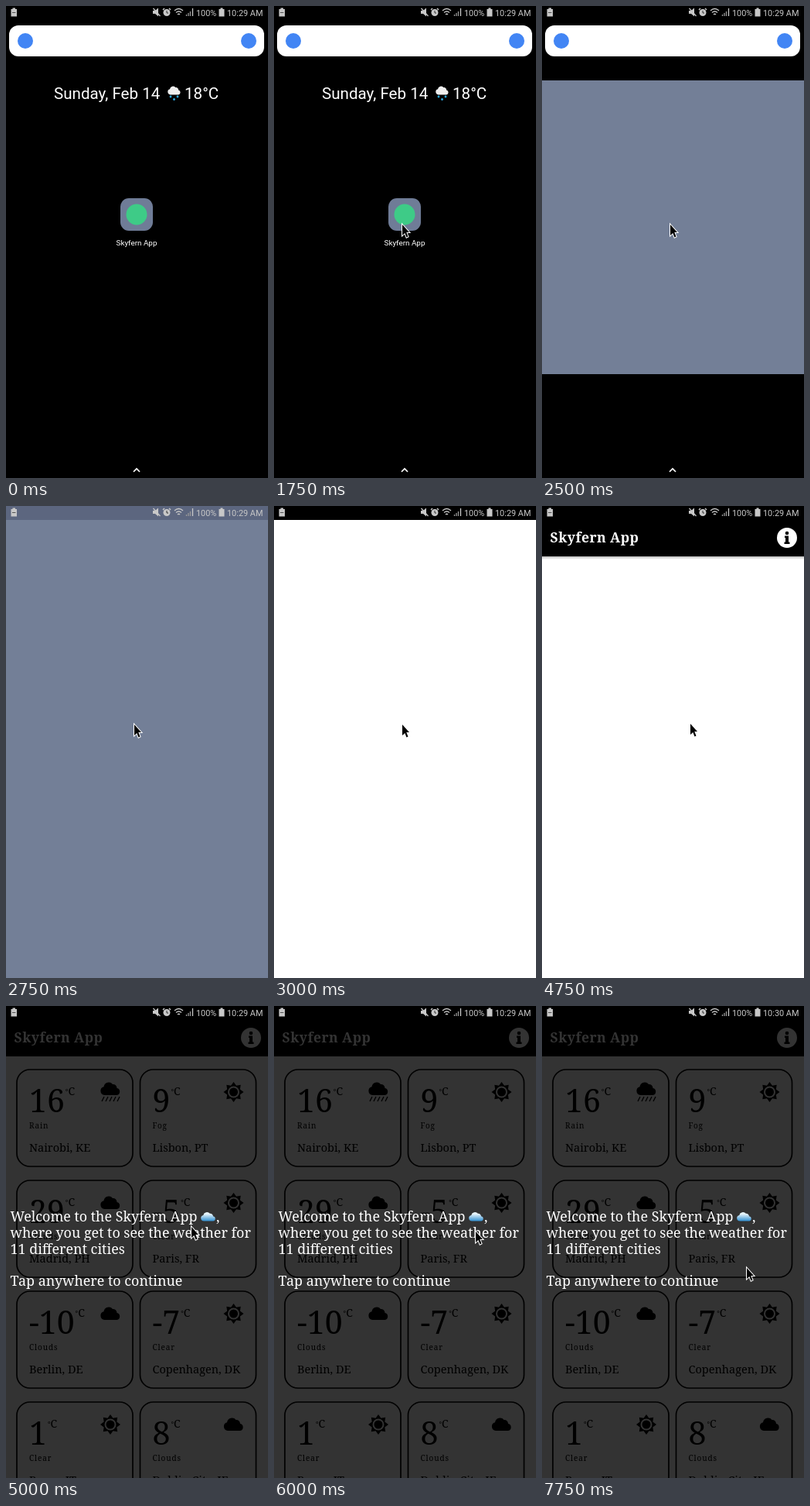
These frames come from a looping animation (339x609 px, 8000 ms). An HTML page:

```html
<!DOCTYPE html>
<html lang="en">
<head>
<meta charset="utf-8">
<title>Skyfern App</title>
<style>
  html, body { margin: 0; width: 100%; height: 100%; overflow: hidden; background: #000; }
  svg { display: block; width: 339px; height: 609px; }
  .sans { font-family: Roboto, sans-serif; }
  .serif { font-family: "Noto Serif", serif; }
</style>
</head>
<body>
<svg id="stage" viewBox="0 0 339 609" xmlns="http://www.w3.org/2000/svg">
  <defs>
    <path id="cloud" d="M5.5 18A5.5 5.5 0 0 1 4.5 7.2A6.5 6.5 0 0 1 16 4A5 5 0 0 1 21.5 9A4.6 4.6 0 0 1 21.5 18Z"/>
    <g id="rain">
      <use href="#cloud"/>
      <path d="M5 20l-3 6M10 20l-3 6M15 20l-3 6M20 20l-3 6M25 20l-3 6" stroke="#000" stroke-width="1.3"/>
    </g>
    <g id="heading">
      <rect y="18" width="339" height="47" fill="#000"/>
      <text class="serif" x="10.5" y="47" font-size="17.6" font-weight="700" letter-spacing=".4">Skyfern App</text>
      <circle cx="317" cy="41" r="13"/>
      <g fill="#000">
        <path d="M314 38.5h5v8h1.500v2.500h-7v-2.500h1.500v-5.500h-1z"/>
        <circle cx="317" cy="35" r="2.3"/>
      </g>
    </g>
    <linearGradient id="shade" x2="0" y2="1">
      <stop stop-color="#bbb"/><stop offset="1" stop-color="#fff"/>
    </linearGradient>
    <linearGradient id="sky" x2="0" y2="1">
      <stop offset=".2" stop-color="#e6f4fc"/><stop offset="1" stop-color="#2f8fd0"/>
    </linearGradient>
  </defs>

  <g id="home" class="sans" fill="#fff">
    <rect width="339" height="609" fill="#000"/>
    <rect x="4" y="25" width="330" height="40" rx="12"/>
    <circle cx="25" cy="45" r="10" fill="#4285f4"/>
    <circle cx="314" cy="45" r="10" fill="#4285f4"/>
    <g font-size="20.6">
      <text x="62" y="119.5">Sunday, Feb 14</text>
      <text x="231" y="120">18°C</text>
    </g>
    <use href="#cloud" transform="translate(209 102.5) scale(.66)" fill="#eee"/>
    <g fill="#29a9e0">
      <circle cx="213" cy="117" r="1.4"/><circle cx="222" cy="117" r="1.4"/><circle cx="217.5" cy="120.5" r="1.4"/>
    </g>
    <rect x="148" y="248" width="42" height="42" rx="11" fill="#6f7c97"/>
    <circle cx="169" cy="269" r="13.5" fill="#3ecb87"/>
    <text x="169" y="309" font-size="9.9" text-anchor="middle">Skyfern App</text>
    <path d="M165 601l4-4 4 4" fill="none" stroke="#fff" stroke-width="1.7"/>
  </g>

  <rect id="splash" fill="#737f97"/>

  <rect id="blank" width="339" height="609" fill="#fff"/>

  <g id="header">
    <rect y="65" width="339" height="4" fill="url(#shade)"/>
    <use href="#heading" fill="#fff"/>
  </g>

  <g id="welcome" class="serif">
    <rect width="339" height="609" fill="#333"/>
    <use href="#heading" fill="#333"/>
    <g id="cards"></g>
    <g fill="#fff" font-size="17.9">
      <text id="greeting" x="5.5" y="278">Welcome to the Skyfern App</text>
      <g id="emoji">
        <use href="#cloud" transform="translate(0 265) scale(.75 .7)" fill="url(#sky)"/>
        <text x="20" y="278">,</text>
      </g>
      <text x="5.5" y="299">where you get to see the weather for</text>
      <text x="5.5" y="319.5">11 different cities</text>
      <text x="5.5" y="361">Tap anywhere to continue</text>
    </g>
  </g>

  <g class="sans" fill="#c8c8c8" font-size="10.9">
    <rect id="bar" width="339" height="18"/>
    <path d="M8.5 2.5h3.500v1.500h2v9.500h-7.500v-9.500h2z"/>
    <path d="M8 8.5h4.500" stroke="#555"/>
    <path d="M190 6h3l4-3.500v11l-4-3.500h-3z"/>
    <path d="M190.5 3l9 10" stroke="#c8c8c8" stroke-width="1.3"/>
    <circle cx="208" cy="8.5" r="4.5"/>
    <path d="M203 5l2-2M213 5l-2-2" stroke="#c8c8c8" stroke-width="1.5"/>
    <path d="M208 6v3h2" stroke="#333" fill="none"/>
    <path d="M218 6q5.500-5 11 0M220 8.500q3.500-3 7 0M222 11q1.500-1.500 3 0" fill="none" stroke="#c8c8c8" stroke-width="1.3"/>
    <path d="M233.5 13v-2M236 13v-4M238.5 13v-6" stroke="#999" stroke-width="1.3"/>
    <path d="M241.5 13v-10" stroke="#c8c8c8" stroke-width="1.3"/>
    <text x="246" y="12.5">100%</text>
    <path d="M277.5 2.5h3v1.500h2v9.500h-7v-9.500h2z"/>
    <text id="clock" x="286" y="12.5"></text>
  </g>

  <path id="cursor" d="M1 1V15L4.300 12L6.500 17.500L8.500 16.500L6.300 11H10Z" stroke="#fff" stroke-width="2" paint-order="stroke"/>
</svg>
<script>
const LOOP = 8000, STEP = 250;
const $ = id => document.getElementById(id);

const sunPoints = Array.from({ length: 16 }, (_, i) => {
  const r = i % 2 ? 9 : 13, a = i * Math.PI / 8;
  return `${13 + r * Math.sin(a)},${13 - r * Math.cos(a)}`;
}).join(" ");
const icons = {
  Rain: '<use href="#rain" y="-1"/>',
  Clouds: '<use href="#cloud" y="3"/>',
  Clear: `<polygon points="${sunPoints}"/><circle cx="13" cy="13" r="7.5" fill="#333"/><circle cx="13" cy="13" r="5.5"/>`
};
icons.Fog = icons.Clear;

const cities = [
  [16, "Rain", "Nairobi, KE"], [9, "Fog", "Lisbon, PT"],
  [29, "Clouds", "Madrid, PH"], [-5, "Clear", "Paris, FR"],
  [-10, "Clouds", "Berlin, DE"], [-7, "Clear", "Copenhagen, DK"],
  [1, "Clear", "Rome, IT"], [8, "Clouds", "Dublin City, IE"]
];
$("cards").innerHTML = cities.map(([degrees, sky, city], i) => `
  <g transform="translate(${14 + i % 2 * 159.5} ${82 + (i >> 1) * 143})">
    <rect width="150" height="125" rx="17" fill="none" stroke="#000" stroke-width="1.7"/>
    <text x="16" y="55" font-size="41">${degrees}<tspan dx="1" dy="-23" font-size="9">°</tspan><tspan dy="1" font-size="14">C</tspan></text>
    <text x="16" y="76" font-size="10" letter-spacing=".9">${sky}</text>
    <text x="16" y="106" font-size="14.5">${city}</text>
    <g transform="translate(108 16)">${icons[sky]}</g>
  </g>`).join("");
$("emoji").setAttribute("transform", `translate(${10 + $("greeting").getComputedTextLength()} 0)`);

// [time, x, y] of the pointer tip
const pointer = [
  [250, 202, 601], [500, 180, 477], [750, 174, 429], [1000, 165, 350],
  [1250, 165, 314], [1500, 166, 290], [1750, 165, 281], [4500, 173, 285],
  [4750, 191, 280], [5000, 239, 284], [5250, 260, 290], [7000, 250, 298],
  [7250, 255, 317], [7500, 263, 334], [7750, 264, 337]
];

function show(id, visible) {
  $(id).style.display = visible ? "" : "none";
}

function setBox(id, x, y, width, height) {
  for (const [key, value] of Object.entries({ x, y, width, height })) $(id).setAttribute(key, value);
}

function draw(now) {
  const t = Math.floor(now % LOOP / STEP) * STEP;
  show("home", t < 2750);
  show("splash", t >= 2500 && t < 3000);
  if (t < 2750) setBox("splash", 0, 96, 339, 379);
  else setBox("splash", 0, 0, 339, 609);
  show("blank", t >= 3000);
  show("header", t >= 4000);
  show("welcome", t >= 5000);
  $("bar").setAttribute("fill", t === 2750 ? "#5c667f" : "#000");
  $("clock").textContent = t < 7000 ? "10:29 AM" : "10:30 AM";

  const spot = pointer.findLast(([time]) => time <= t);
  show("cursor", spot);
  if (spot) $("cursor").setAttribute("transform", `translate(${spot[1]} ${spot[2]})`);
  requestAnimationFrame(() => draw(performance.now() - start));
}

const start = performance.now();
draw(0);
</script>
</body>
</html>
```
